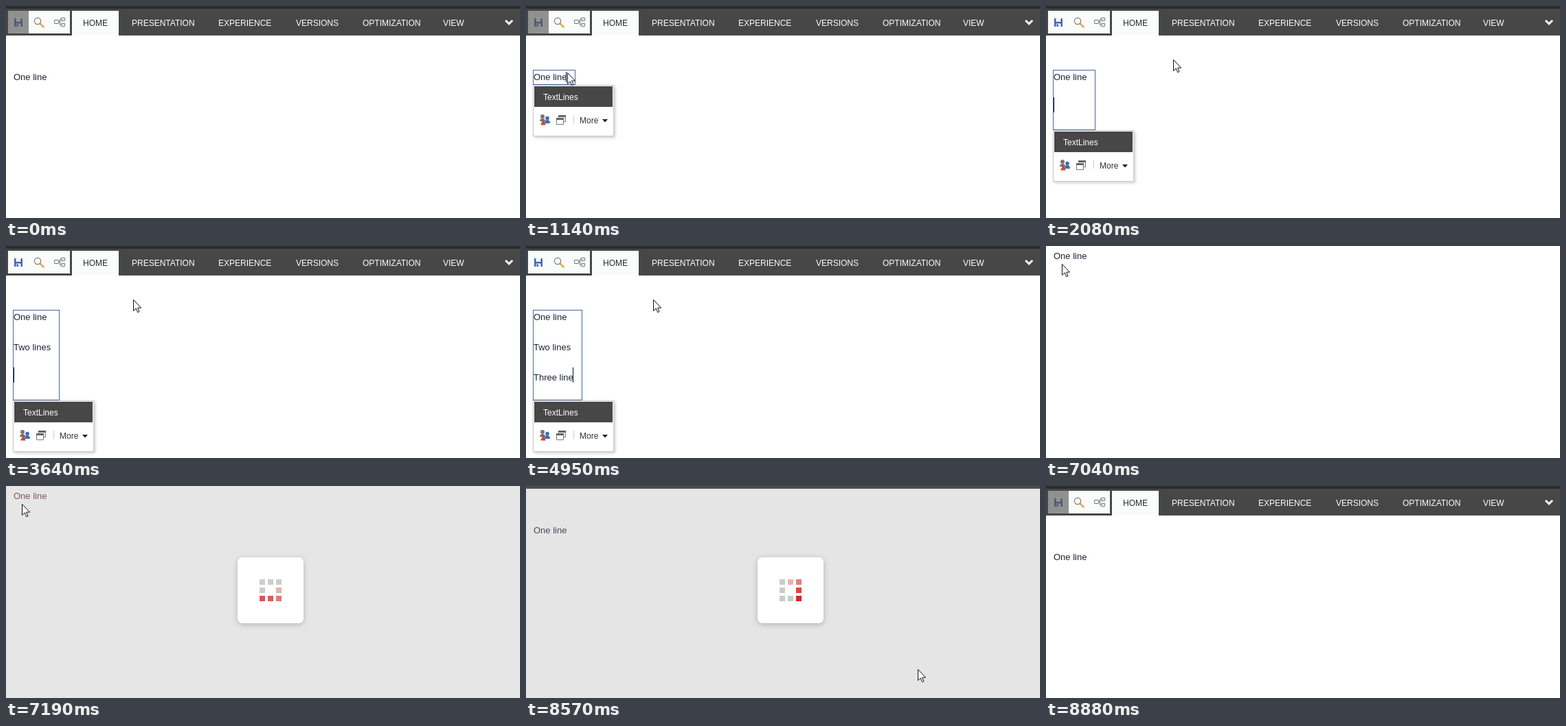
Write an HTML page that moves like this. It is 748x309 px and loops after 9.93 s.

```html
<!DOCTYPE html>
<html lang="en">
<head>
<meta charset="utf-8">
<title>Text lines</title>
<style>
  html, body { margin: 0; width: 100%; height: 100%; overflow: hidden; background: #fff; }
  svg { display: block; width: 748px; height: 309px; font: 12px "Liberation Sans", Arial, sans-serif; }
  text { white-space: pre; }
  .body { font-size: 13px; fill: #1f2233; }
  .tabs { fill: #fff; }
  .line { fill: none; stroke: #777; }
  #pop .card { fill: #fff; stroke: #c9c9c9; filter: drop-shadow(2px 2px 2px rgba(0, 0, 0, .2)); }
  #veil .card { fill: #fff; filter: drop-shadow(0 2px 4px rgba(0, 0, 0, .22)); }
  .pointer { fill: #fff; stroke: #111; stroke-linejoin: round; }
</style>
</head>
<body>
<svg viewBox="0 0 748 309">
  <g class="body" id="lines">
    <text x="11"></text>
    <text x="11" y="152"></text>
    <text x="11" y="196"></text>
  </g>
  <rect id="frame" x="10.5" y="93.5" fill="none" stroke="#4a689e"/>
  <rect id="caret" width="1" fill="#000a30"/>

  <g id="pop">
    <rect class="card" x="10.5" y=".5" width="117" height="74"/>
    <rect x="12" y="2" width="114" height="30" fill="#474747"/>
    <text x="25" y="22" fill="#fff">TextLines</text>
    <g fill="#777">
      <circle cx="24" cy="46" r="3"/>
      <path d="M20 53q0-4 4-4t4 4z"/>
    </g>
    <g fill="#3f6db5">
      <circle cx="31" cy="48.5" r="2.8"/>
      <path d="M27 56q0-5 4-5t4 5z"/>
    </g>
    <g fill="#c24a3e">
      <circle cx="25" cy="53" r="2.2"/>
      <path d="M21.500 58.500q0-4 3.500-4t3.500 4z"/>
    </g>
    <path class="line" d="M47.500 47.500V44.500H57.500V53.500H55M44.500 48.500H54.500V57.500H44.500z"/>
    <path d="M47 44h11v3h-11zM44 48h11v3h-11z" fill="#666"/>
    <path d="M69.500 44v12" stroke="#ccc"/>
    <text x="78" y="56" fill="#333">More</text>
    <path d="M111 50h8l-4 4.500z" fill="#222"/>
  </g>

  <rect id="strip" width="748" height="4" fill="#2b2b2b"/>
  <g id="ribbon">
    <rect y="4" width="748" height="39" fill="#474747"/>
    <rect x="3" y="7" width="90" height="33" fill="#fafbfb"/>
    <rect id="save" x="3" y="7" width="30" height="33"/>
    <g id="disk">
      <path d="M12 18h11l1 1v11h-12z"/>
      <path d="M14.500 18h7v5h-7zM14.500 25.500h7v4.500h-7z" fill="#f4f6fa"/>
      <path d="M15.500 26.500h2.500v3.500h-2.500z"/>
    </g>
    <path d="M50 26l4.500 4.500" stroke="#e5ae55" stroke-width="2.600" stroke-linecap="round"/>
    <circle class="line" cx="46" cy="22" r="4.600" stroke-width="1.200"/>
    <path class="line" d="M70.500 20.500h6v5h-6zM80.500 17.500h5v4h-5zM80.500 25.500h5v4h-5zM77 23h1.500M80 19.500h-1.500v8h1.500"/>
    <path d="M96 7h68v36h-68z" fill="#fafcfc"/>
    <text x="112" y="29" fill="#2b2b2b">HOME</text>
    <g class="tabs">
      <text x="183" y="29">PRESENTATION</text>
      <text x="309" y="29">EXPERIENCE</text>
      <text x="422" y="29">VERSIONS</text>
      <text x="519" y="29">OPTIMIZATION</text>
      <text x="636" y="29">VIEW</text>
    </g>
    <path d="M727 21l5 5 5-5" fill="none" stroke="#fff" stroke-width="3"/>
  </g>

  <g id="veil">
    <rect width="748" height="309" fill="#a5a5a5" fill-opacity=".29"/>
    <rect class="card" x="337" y="104" width="96" height="96" rx="7"/>
    <g id="dots"></g>
  </g>

  <g id="cursor">
    <path id="arrow" class="pointer" d="M.5.5V16.500L4.200 13 6.700 18.700 9 17.700 6.600 12.100H11.600z"/>
    <path id="beam" d="M-2.500.5h2l1 1 1-1h2M.5 1.500v14M-2.500 16.500h2l1-1 1 1h2" fill="none" stroke="#222"/>
    <path id="hand" class="pointer" d="M-1.500 13V2q0-1.500 1.500-1.500T1.500 2V8q0-1.300 1.500-1.300T4.500 8V9q0-1.200 1.400-1.200T7.300 9V10.200q0-1.200 1.300-1.200T10 10.500V16q0 2-1.700 3.500V21.500H0V19.500L-5 13.500Q-6-1.500 -5 11.500Q-3.500 10-1.500 13z"/>
  </g>
</svg>

<script>
const LOOP = 9930, STEP = 77;
const $ = id => document.getElementById(id);
const rows = [...$('lines').children];
const set = (el, attrs) => { for (const k in attrs) el.setAttribute(k, attrs[k]); };
const show = (el, on) => { el.style.display = on ? '' : 'none'; };

$('hand').setAttribute('d', 'M-1.500 12V2Q-1.500.5 0 .5T1.500 2V8Q1.500 6.700 3 6.700T4.500 8V9Q4.500 7.800 5.900 7.800T7.300 9V10.200Q7.300 9 8.600 9T10 10.500V16Q10 18 8.300 19.500V21.500H0V19.500L-5 13.500Q-6 11.500-4.500 11Q-3 10.500-1.500 13z');

// Key times for each typed character
const second = [2160, 2310, 2610, 2770, 2920, 3070, 3120, 3170, 3310];
const third = [3720, 3860, 3940, 4030, 4170, 4250, 4320, 4550, 4710, 4870, 5030];
const typed = (word, keys, t) => word.slice(0, keys.filter(k => k <= t).length);

// Spinner: cells clockwise from top left, and when the head reaches each
const ring = [[0, 0], [1, 0], [2, 0], [2, 1], [2, 2], [1, 2], [0, 2], [0, 1]];
const heads = [[7190, 6], [7260, 7], [7500, 1], [7580, 2], [7730, 3], [7880, 4], [7960, 5],
  [8050, 6], [8340, 1], [8420, 2], [8500, 3], [8570, 4], [8650, 5], [8730, 6]];
const softTrail = ['#d65352', '#d95755', '#de7674', '#e4b0ae'];
const trail = ['#dc2522', '#e2423e', '#e77e7c', '#ecb1ae'];
const dots = ring.map(([x, y]) => {
  const dot = document.createElementNS('http://www.w3.org/2000/svg', 'rect');
  set(dot, { x: 369 + 12 * x, y: 136 + 12 * y, width: 8, height: 8 });
  return $('dots').appendChild(dot);
});

// Pointer moves: start, number of steps, from, to, shape
const moves = [
  [70, 7, [404, 253], [60, 97], 'arrow'],
  [610, 0, [60, 97], [60, 97], 'beam'],
  [1070, 4, [60, 97], [185, 78], 'arrow'],
  [5400, 8, [185, 78], [34, 28], 'arrow'],
  [5940, 1, [52, 33], [34, 28], 'hand'],
  [6020, 2, [34, 28], [29, 27], 'hand'],
  [6410, 0, [25, 26], [25, 26], 'hand'],
  [6880, 0, [23, 26], [23, 26], 'arrow'],
  [8263, 4, [23, 26], [570, 267], 'arrow']
];

function drawCursor(t) {
  const on = t >= 70 && t < 8880;
  show($('cursor'), on);
  if (!on) return;
  const [start, steps, a, b, shape] = moves.filter(m => m[0] <= t).pop();
  const p = steps ? Math.min(1, Math.floor((t - start) / STEP + .05) / steps) : 1;
  const ease = p * p * (3 - 2 * p);
  const [x, y] = a.map((v, i) => Math.round(v + (b[i] - v) * ease));
  $('cursor').setAttribute('transform', `translate(${x} ${y})`);
  for (const id of ['arrow', 'beam', 'hand']) show($(id), id === shape);
}

function drawText(t) {
  const reload = t >= 7040;
  const two = reload ? '' : typed('Two lines', second, t);
  const three = reload ? '' : typed('Three lines', third, t);
  const top = t < 7040 || t >= 8730 ? 108 : t < 7500 ? 19 : 69;
  rows[0].setAttribute('y', top);
  rows[0].style.fill = t >= 7190 && t < 7260 ? '#70323e' : '';
  ['One line', two, three].forEach((s, i) => {
    if (rows[i].textContent !== s) rows[i].textContent = s;
  });

  const editing = t >= 1070 && !reload;
  for (const id of ['frame', 'pop', 'caret']) show($(id), editing);
  if (!editing) return;
  const row = t < 1920 ? 0 : t < 3560 ? 1 : 2;
  const height = [22, 88, 132][row];
  const widths = rows.map(r => r.textContent ? r.getComputedTextLength() : 0);
  set($('frame'), { width: Math.round(Math.max(...widths) + 12.8), height: height - 1 });
  $('pop').setAttribute('transform', `translate(0 ${93 + height})`);

  const blink = (t >= 1620 && t < 1920) || (t >= 5560 && t < 6100) || t >= 6650;
  show($('caret'), !blink);
  set($('caret'), {
    x: row ? 11 + Math.floor(widths[row]) : 58,
    y: row ? 89 + 44 * row : 96,
    height: row ? 22 : 15
  });
}

function drawRibbon(t) {
  show($('ribbon'), t < 7040 || t >= 8730);
  show($('strip'), t < 7040 || t >= 7500);
  const active = t >= 1920 && t < 6800;
  $('save').style.fill = !active ? '#919191' : t >= 5940 ? '#e2e2e2' : '#fafbfb';
  $('disk').style.fill = active ? '#4468a8' : '#4f5a6e';
  $('disk').children[1].style.fill = !active ? '#919191' : '#f4f6fa';
}

function drawVeil(t) {
  const on = t >= 7190 && t < 8800;
  show($('veil'), on);
  if (!on) return;
  $('veil').style.opacity = t < 7260 ? .97 : t < 8650 ? 1 : t < 8730 ? .7 : .35;
  const head = heads.filter(h => h[0] <= t).pop()[1];
  const tones = t < 7500 ? softTrail : trail;
  dots.forEach((dot, i) => { dot.style.fill = tones[(head - i + 8) % 8] || '#cbcbcb'; });
}

function draw(now) {
  const t = now % LOOP;
  drawText(t);
  drawRibbon(t);
  drawVeil(t);
  drawCursor(t);
}

const begin = performance.now();
function tick() {
  draw(performance.now() - begin);
  requestAnimationFrame(tick);
}
tick();
</script>
</body>
</html>
```
